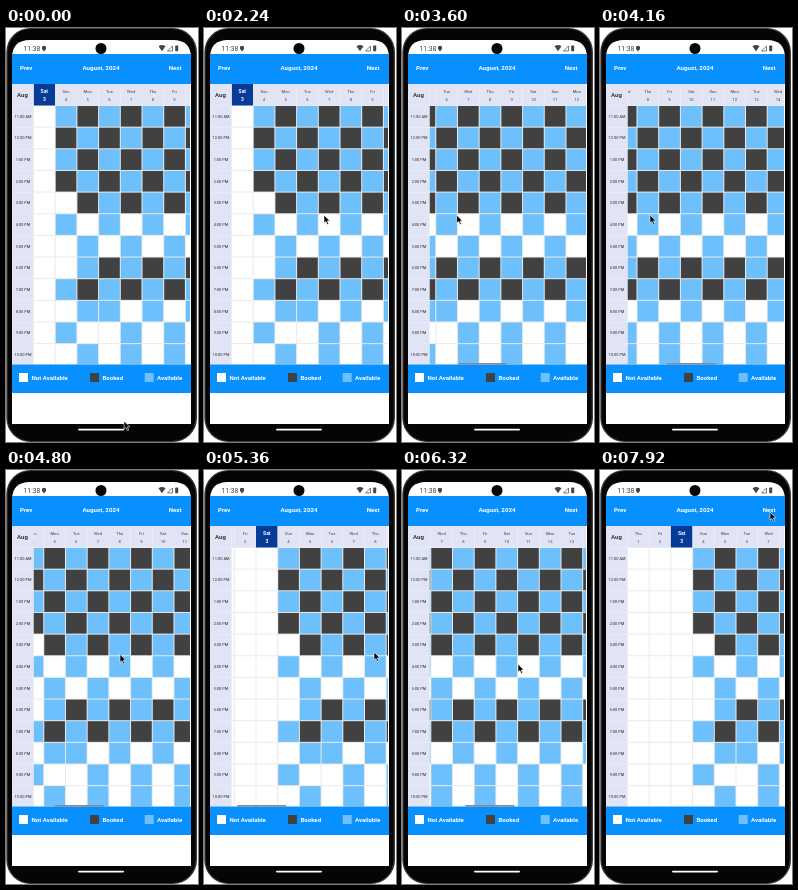
These frames come from a looping animation (192x414 px, 8000 ms). An HTML page:

```html
<!DOCTYPE html>
<html lang="en">
<head>
<meta charset="utf-8">
<title>Booking calendar</title>
<style>
  html, body { margin: 0; width: 100%; height: 100%; overflow: hidden; background: #fff; }
  svg { display: block; width: 100%; height: 100%; font-family: Roboto, sans-serif; }
</style>
</head>
<body>
<svg id="stage" viewBox="0 0 192 414">
  <defs>
    <clipPath id="view"><rect x="27.5" y="55.5" width="156.5" height="281"/></clipPath>
  </defs>
</svg>
<script>
const LOOP = 8000, STEP = 80;
const LEFT = 27.5, TOP = 77.5, COL = 21.7, ROW = 21.65, GAP = .5;
const BLUE = '#0890ff', NAVY = '#073b98', PALE = '#e0e4f4', BLACK = '#050505', GREY = '#444';
const FILL = { W: '#fff', B: '#6dc0fb', D: '#414141' };
const WEEK = ['Sun', 'Mon', 'Tue', 'Wed', 'Thu', 'Fri', 'Sat'];

// One letter per hour: W not available, B available, D booked.
const FIRST_DAYS = { 4: 'BDBDWBWWBWBW', 5: 'DBDBDWBBDBWB' };
const slots = day => day < 4 ? 'W'.repeat(12)
  : FIRST_DAYS[day] || (day % 2 ? 'DBDBDWBBDWBB' : 'BDBDBBWDBBWW');

const stage = document.getElementById('stage');

function add(parent, tag, attrs, content) {
  const node = document.createElementNS('http://www.w3.org/2000/svg', tag);
  for (const key in attrs) node.setAttribute(key, attrs[key]);
  if (content !== undefined) node.textContent = content;
  parent.append(node);
  return node;
}
const rect = (parent, x, y, width, height, fill, rx = 0) =>
  add(parent, 'rect', { x, y, width, height, fill, rx });
const path = (d, attrs) => add(stage, 'path', { d, ...attrs });
const label = (parent, x, y, size, content, fill = '#333', weight = 400, anchor = 'middle') =>
  add(parent, 'text', { x, y, fill, 'font-size': size, 'font-weight': weight, 'text-anchor': anchor }, content);

function drawPhone() {
  rect(stage, .3, 0, 190.7, 414, '#3a3a3a', 24);
  rect(stage, 1.6, 1, 188, 412, BLACK, 23);
  path('M6 396V30Q6 12 24 12H167Q185 12 185 30V396Z', { fill: '#fff' });
  add(stage, 'circle', { cx: 95, cy: 20.5, r: 5.5, fill: BLACK });
  label(stage, 17.5, 23, 6.8, '11:38', GREY, 400, 'start');
  path('M36 18.5L38 17.7L40 18.5V21L38 23.5L36 21Z', { fill: GREY });
  path('M152.5 18.3Q156 15.8 159.5 18.3L156 23.2Z', { fill: GREY });
  path('M161.5 23H166.5V18Z', { fill: 'none', stroke: GREY, 'stroke-width': .7 });
  rect(stage, 169.2, 17.6, 3, 5.7, GREY, .7);
  rect(stage, 72, 400.8, 46, 1.6, '#fff', .8);
}

function drawBars() {
  rect(stage, 6, 26, 179, 30, BLUE);
  label(stage, 14, 42.2, 6.1, 'Prev', '#fff', 700, 'start');
  label(stage, 95, 42.2, 6.2, 'August, 2024', '#fff', 700);
  label(stage, 175.5, 42.2, 6.1, 'Next', '#fff', 700, 'end');
  rect(stage, 6, 336.5, 179, 28.5, BLUE);
  ['Not Available', 'Booked', 'Available'].forEach((name, i) => {
    const x = [13, 84, 138.7][i];
    rect(stage, x, 345, 9, 9, Object.values(FILL)[[0, 2, 1][i]]);
    label(stage, x + 12.4, 352, 6.1, name, '#fff', 700, 'start');
  });
}

function drawHours() {
  rect(stage, 6, 55.5, 21.5, 281, PALE);
  label(stage, 16.5, 69, 6, 'Aug', '#333', 700);
  for (let i = 0; i < 12; i++) {
    const y = TOP + i * ROW;
    rect(stage, 6, y, 21.5, .5, '#eef0f8');
    label(stage, 17, y + 12.3, 4, `${(i + 10) % 12 + 1}:00 ${i ? 'PM' : 'AM'}`);
  }
}

function drawDays() {
  const clip = add(stage, 'g', { 'clip-path': 'url(#view)' });
  rect(clip, LEFT, TOP, 157, 259, '#eaeaea');
  const days = add(clip, 'g', {});
  for (let day = 1; day <= 31; day++) {
    const x = LEFT + (day - 1) * COL, today = day === 3;
    const style = today ? ['#fff', 700] : [GREY, 400], size = today ? 5 : 4.2;
    rect(days, x, 55.5, COL + .1, 22, today ? NAVY : PALE);
    if (!today) rect(days, x, 55.5, .4, 22, '#eef0f8');
    label(days, x + COL / 2, 65.3, size, WEEK[(day + 3) % 7], ...style);
    label(days, x + COL / 2, 72.5, size, day, ...style);
    [...slots(day)].forEach((kind, i) =>
      rect(days, x + GAP, TOP + i * ROW + GAP, COL - 2 * GAP, ROW - 2 * GAP, FILL[kind]));
  }
  return days;
}

drawPhone();
const days = drawDays();
drawHours();
drawBars();
const scrollbar = rect(stage, LEFT, 335, 49, 1.6, '#858b92');
const pointer = path('M0 0V8.2L1.9 6.5L3.3 9.6L4.7 9L3.3 6H5.8Z',
  { fill: '#000', stroke: '#fff', 'stroke-width': .6 });

function frame(now) {
  const time = Math.floor(now % LOOP / STEP) * STEP;
  const ramp = (start, end) => Math.min(1, Math.max(0, (time - start) / (end - start)));

  const arrive = ramp(480, 640);
  const forward = ramp(2780, 4160), flick = 1 - (1 - forward) ** 3;
  const back = ramp(4160, 5360);
  const again = ramp(5360, 6000);
  const home = ramp(6400, 7120);
  const leave = ramp(7280, 7840);

  const scroll = 2 * COL + 99 * forward - 123.5 * back + 110 * again - 128.9 * home;
  const x = 118 + 2 * arrive - 70 * flick + 120 * back - 54 * again + 54 * home;
  const y = 393 - 206 * arrive - 5 * back + 12 * again - 152 * leave;

  days.setAttribute('transform', `translate(${-scroll} 0)`);
  scrollbar.setAttribute('x', LEFT + .5 + scroll * .275);
  scrollbar.setAttribute('opacity', ramp(2800, 2960) - ramp(7200, 7440));
  pointer.setAttribute('transform', `translate(${x} ${y})`);
  requestAnimationFrame(frame);
}
frame(performance.now());
</script>
</body>
</html>
```
